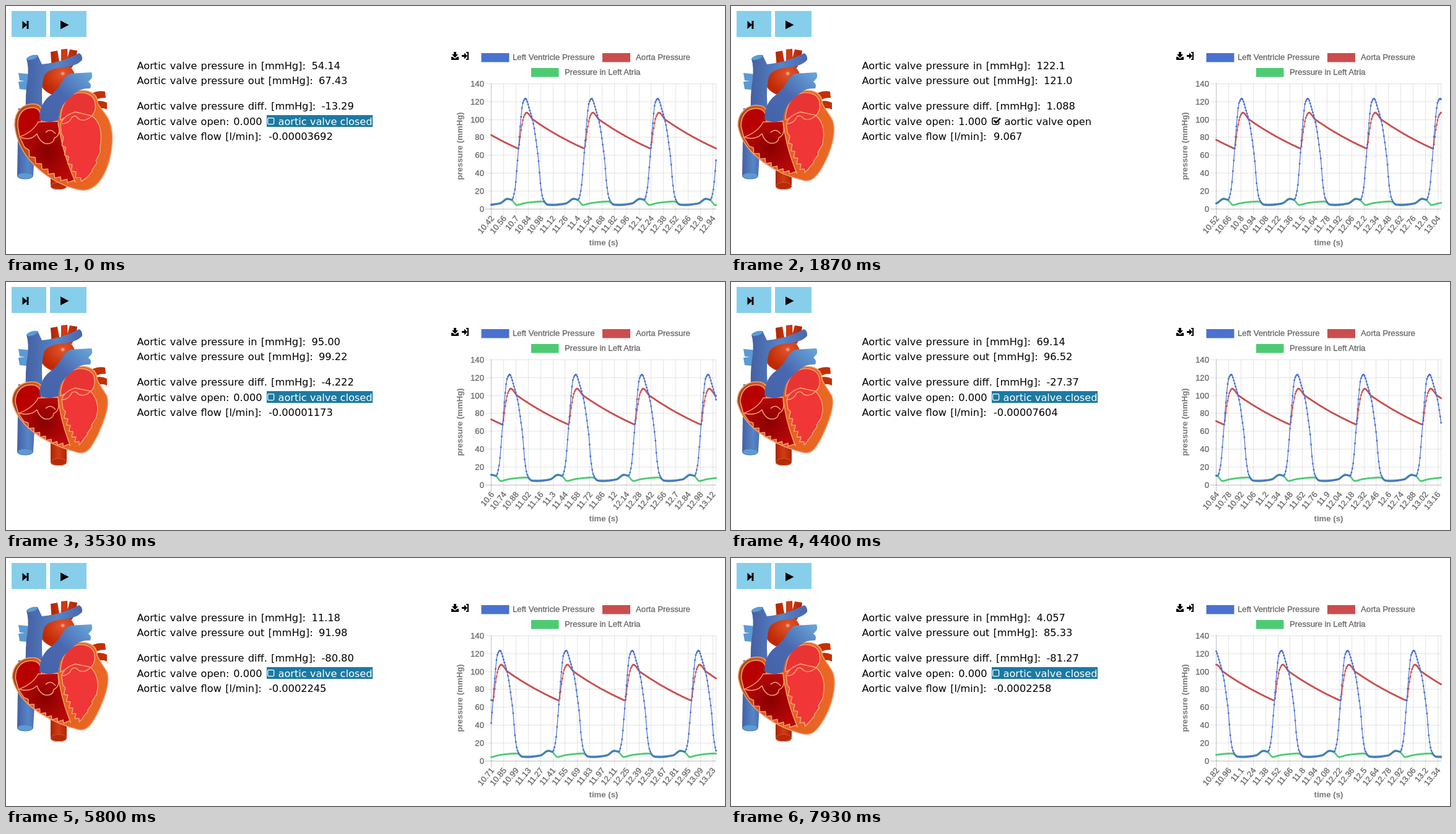
Write an HTML page that moves like this. It is 1161 by 400 pixels and loops after 8 s.

```html
<!DOCTYPE html>
<html lang="en">
<head>
<meta charset="utf-8">
<title>Aortic valve simulation</title>
<style>
html, body { margin: 0; width: 100%; height: 100%; overflow: hidden; background: #fff; }
svg { display: block; }
.read { font: 16.2px "DejaVu Sans", Verdana, sans-serif; }
.label { word-spacing: 1.1px; }
.chart { font: 13.2px "Liberation Sans", Arial, sans-serif; fill: #666; }
.plain { stroke: #666; stroke-width: .3; }
.bold { font-weight: bold; fill: #777; }
.wall { stroke: #f3a273; stroke-width: 1.5; stroke-linejoin: round; }
.line { fill: none; stroke-width: 1.2; }
.dots { fill: none; stroke-width: 3; stroke-linecap: round; }
</style>
</head>
<body>
<svg width="1161" height="400" viewBox="0 0 1161 400">
  <defs>
    <linearGradient id="vein"><stop offset="0" stop-color="#4560a4"/><stop offset=".55" stop-color="#5685c6"/><stop offset="1" stop-color="#4a66ad"/></linearGradient>
    <linearGradient id="artery"><stop offset="0" stop-color="#b02400"/><stop offset=".5" stop-color="#cf3c15"/><stop offset="1" stop-color="#b02400"/></linearGradient>
    <linearGradient id="trunk" x1="0" y1="1" x2="1" y2="0"><stop offset="0" stop-color="#4563a8"/><stop offset=".5" stop-color="#4a68b0"/><stop offset="1" stop-color="#68a8dc"/></linearGradient>
    <radialGradient id="arch" cx=".65" cy=".35" r=".6"><stop offset="0" stop-color="#f6c0a6"/><stop offset=".12" stop-color="#dd5029"/><stop offset="1" stop-color="#c02800"/></radialGradient>
    <radialGradient id="rv"><stop offset="0" stop-color="#880000"/><stop offset="1" stop-color="#b80808"/></radialGradient>
    <linearGradient id="muscle"><stop offset="0" stop-color="#a84512"/><stop offset=".3" stop-color="#e35d1e"/><stop offset="1" stop-color="#ea6825"/></linearGradient>
  </defs>

  <g fill="#87ceeb"><rect x="9" y="8" width="56" height="42"/><rect x="71" y="8" width="59" height="42"/></g>
  <path d="M26.500 24L33.500 30V24H36.500V37H33.500V31L26.500 37ZM88 23.500L101.500 30.500L88 37.500Z"/>

  <g>
    <path fill="url(#artery)" d="M72 235H98V290Q98 296 85 296Q72 296 72 290Z"/>
    <ellipse cx="85" cy="290" rx="12.500" ry="5.500" fill="#b52b08" stroke="#d4562f"/>
    <path fill="url(#vein)" d="M20 165H50L44 274Q42 279 31 279Q19 279 18 274Z"/>
    <ellipse cx="31" cy="274" rx="12.500" ry="5" fill="#5c9bd2" stroke="#4a78b8"/>
    <path fill="#c23000" d="M130 146Q145 135 160 138L161 148Q148 147 140 156ZM136 158Q150 149 163 156L163 167Q154 162 144 168Z"/>
    <path fill="url(#artery)" d="M72 74L83 72L88 100H74ZM89 70L99 69L100 98H89ZM103 70L115 72Q113 90 106 100L96 96Z"/>
    <ellipse cx="83" cy="117" rx="29" ry="27" fill="url(#arch)"/>
    <path fill="#5b9ad4" d="M20 108L40 110V122L22 120ZM20 122L40 120V136L22 134Z"/>
    <path fill="url(#vein)" d="M33 85Q41 78 51 79L58 94Q88 92 118 76Q124 79 123 87Q114 97 92 99Q68 101 62 112Q56 130 59 165L32 168Q31 140 35 118Q37 98 33 85Z"/>
    <ellipse cx="42" cy="83" rx="9" ry="3.500" fill="#5c9bd2" transform="rotate(-16 42 83)"/>
  </g>
  <g id="heart"></g>

  <g class="read">
    <g id="values"></g>
    <g id="shut">
      <rect x="421" y="176" width="171" height="19" fill="#1b7aa3"/>
      <rect x="422.600" y="180.600" width="10" height="10" rx="1.500" fill="none" stroke="#fff" stroke-width="1.300"/>
      <text x="439.500" y="191.500" fill="#fff">aortic valve closed</text>
    </g>
    <g id="ajar">
      <path d="M432.500 186V189Q432.500 191 430.500 191H424Q422 191 422 189V182.500Q422 180.500 424 180.500H430.500" fill="none" stroke="#000" stroke-width="1.500"/>
      <path d="M424.500 184.500L428 188L435 181" fill="none" stroke="#000" stroke-width="2.600"/>
      <text x="441.500" y="191.500">aortic valve open</text>
    </g>
  </g>

  <path d="M723 74H727V78H730L725 83.500L720 78H723ZM719 82H721.500L725 85L728.500 82H731V87H719ZM736 79H740V75.500L745 80.500L740 85.500V82H736ZM743 74H747V87H743V85.200H745V75.800H743Z"/>

  <g class="chart">
    <rect x="767.500" y="76" width="45" height="14.500" fill="#4a71cf"/>
    <rect x="963" y="76" width="45" height="14.500" fill="#cb4d4d"/>
    <rect x="848" y="100" width="44.500" height="14.500" fill="#4dcb73"/>
    <g class="plain">
      <text x="818" y="87">Left Ventricle Pressure</text>
      <text x="1017" y="87">Aorta Pressure</text>
      <text x="902" y="111">Pressure in Left Atria</text>
    </g>
    <text class="bold" x="965" y="385.500" text-anchor="middle">time (s)</text>
    <text class="bold" transform="translate(736.500 226) rotate(-90)" text-anchor="middle">pressure (mmHg)</text>
    <g id="grid" stroke="#000"></g>
    <g id="ticks" class="plain"></g>
  </g>
  <g id="plot"></g>
</svg>
<script>
const $ = id => document.getElementById(id);
const add = (parent, tag, attrs, text = '') => {
  const el = document.createElementNS('http://www.w3.org/2000/svg', tag);
  for (const k in attrs) el.setAttribute(k, attrs[k]);
  el.textContent = text;
  return parent.appendChild(el);
};

// Smooth curve through key points, without overshoot
function spline(pts) {
  const d = pts.slice(1).map(([x, y], i) => (y - pts[i][1]) / (x - pts[i][0]));
  const m = pts.map((_, i) => {
    const a = d[i - 1] ?? d[i], b = d[i] ?? d[i - 1];
    return a * b > 0 ? 2 * a * b / (a + b) : 0;
  });
  return x => {
    let i = 0;
    while (i < d.length - 1 && pts[i + 1][0] < x) i++;
    const [x0, y0] = pts[i], [x1, y1] = pts[i + 1], h = x1 - x0;
    const s = Math.max(0, Math.min(1, (x - x0) / h)), r = 1 - s;
    return r * r * (1 + 2 * s) * y0 + s * s * (3 - 2 * s) * y1 + h * s * r * (r * m[i] - s * m[i + 1]);
  };
}

// Pressures over one heartbeat; the phase p is in steps of 0.01 s
const BEAT = 75.33, SPAN = 256;
const ventricle = spline([[0, 54.14], [3, 92], [6, 118.2], [9, 123], [14, 109.6], [18, 95], [22, 69.143],
  [24, 53], [26, 28.5], [29, 11.18], [34, 4.548], [40, 4.057], [55, 5.8], [64, 10.9], [69, 10.2],
  [72.3, 21.5], [BEAT, 54.14]]);
const atrium = spline([[0, 4.2], [10, 6.6], [28, 8.1], [35, 4.9], [42, 4.9], [55, 6.2], [63.7, 11.4],
  [69, 9.3], [74.5, 4.2], [BEAT, 4.2]]);
const decay = p => 10.6 + 81.38 * Math.exp(-.00775 * (p - 29));
const ejection = spline([[0, 67.43], [1, 67.6], [4, 88], [7, 102.5], [10.3, 107.3], [17, decay(17)]]);
const aorta = p => p < 17 ? ejection(p) : decay(p);
const valveDrop = p => 1.756 - .16696 * (p - 6);

const phase = n => ((n % BEAT) + BEAT) % BEAT;
const curves = [['#4dcb73', atrium], ['#cb4d4d', aorta], ['#4a71cf', ventricle]].map(([stroke, fn]) => ({
  fn,
  line: add($('plot'), 'path', { class: 'line', stroke }),
  dots: add($('plot'), 'path', { class: 'dots', stroke })
}));

const X0 = 783.5, X1 = 1146.5, Y0 = 327, DX = (X1 - X0) / SPAN, DY = 202.3 / 140;
const rule = (x1, y1, x2, y2, o) =>
  add($('grid'), 'path', { d: `M${x1} ${y1}L${x2} ${y2}`, 'stroke-opacity': o });
for (let v = 0; v <= 140; v += 20) {
  const y = Math.round(Y0 - v * DY) + .5;
  rule(X0 - 10, y, X1, y, v ? .1 : .25);
  add($('ticks'), 'text', { x: 772, y: y + 4, 'text-anchor': 'end' }, v);
}
const times = Array.from({ length: 19 }, (_, i) => {
  const x = X0 + i * 14 * DX, gx = Math.floor(x + .3) + .5;
  rule(gx, 124.5, gx, 337.5, i ? .1 : .25);
  return add($('ticks'), 'text', {
    transform: `translate(${x + 2} 340) rotate(-50)`, 'text-anchor': 'end', y: 4.5
  });
});
rule(X1, 124.5, X1, 327, .1);

const [pinText, poutText, diffText, openText, flowText] = [
  ['pressure in [mmHg]:', 102, 493.5],
  ['pressure out [mmHg]:', 126, 505],
  ['pressure diff. [mmHg]:', 166.5, 509.5],
  ['open:', 191.5, 367.3],
  ['flow [l/min]:', 216, 424]
].map(([label, y, x]) => {
  add($('values'), 'text', { class: 'label', x: 211.5, y }, 'Aortic valve ' + label);
  return add($('values'), 'text', { x, y });
});

// Ragged muscle edge: teeth along a quadratic curve from a over c to b
function ragged(a, c, b, n) {
  let d = '';
  for (let i = 1; i <= n; i++) {
    const s = i / n, r = 1 - s, tooth = i < n ? (i % 2 ? 2.2 : -2.2) : 0;
    const [x, y] = [0, 1].map(j => r * r * a[j] + 2 * r * s * c[j] + s * s * b[j]);
    d += `L${(x + tooth).toFixed(1)} ${(y - tooth).toFixed(1)}`;
  }
  return d;
}

// Heart parts: fill, relaxed outline, contracted outline
const parts = [
  ['url(#muscle)',
    'M14 193C13 168 29 157 45 158C55 158 60 165 62 185L85 180C85 160 95 140 115 137C135 134 148 142 148 157C152 165 163 175 167 186C178 215 168 262 150 284C140 296 128 299 116 296C75 287 20 250 14 193Z',
    'M10 193C10 171 27 160 43 161C55 161 59 168 61 185L85 180C85 160 95 140 115 137C135 134 147 142 147 157C150 165 158 175 163 184C168 200 158 225 149 245C138 268 130 279 116 275C80 266 20 240 10 193Z'],
  ['#b80000',
    'M19 194C18 172 30 163 44 164C54 165 57 172 57 187Q50 200 40 207Q28 212 22 211Z',
    'M15 194C15 174 28 165 42 166C54 167 57 174 57 187Q50 200 40 207Q28 213 20 212Z'],
  ['#e93434',
    'M88 184C88 162 98 143 116 140C132 138 144 146 144 158C146 168 141 174 138 178L112 171Z',
    'M88 184C88 162 98 143 116 140C132 138 143 146 143 158C144 168 140 174 136 177L112 171Z'],
  ['url(#rv)',
    `M22 211Q44 203 52 187L84 186Q90 235 112 284${ragged([112, 284], [70, 282], [30, 228], 16)}Z`,
    `M20 212Q44 203 52 187L84 186Q88 225 104 264${ragged([104, 264], [66, 262], [29, 225], 16)}Z`],
  ['#f03636',
    `M112 171L138 177C152 185 156 205 152 228${ragged([152, 228], [145, 270], [122, 283], 8)}${ragged([122, 283], [98, 260], [89, 205], 12)}L88 190Q94 176 112 171Z`,
    `M112 171L136 176C146 185 150 200 147 213${ragged([147, 213], [134, 246], [118, 263], 8)}${ragged([118, 263], [103, 243], [92, 205], 12)}L90 190Q94 176 112 171Z`],
  ['none',
    'M24 212Q40 218 50 206Q54 219 64 222Q77 223 78 213Q90 208 84 190M64 204Q72 196 80 206',
    'M22 212Q40 216 50 206Q54 218 63 221Q76 222 77 212Q88 207 84 190M64 204Q72 196 80 206'],
  ['none',
    'M90 190Q102 190 106 180Q112 174 117 182Q126 188 138 178',
    'M91 190Q102 189 106 179Q112 174 117 181Q126 186 136 177']
].map(([fill, rest, tight]) => ({ el: add($('heart'), 'path', { class: 'wall', fill }), rest, tight }));
add($('heart'), 'path', {
  fill: 'url(#trunk)',
  d: 'M104 109L138 107Q141 114 137 118L133 122Q139 126 136 133Q120 132 110 142Q94 154 88 166Q86 172 85 183Q70 191 54 183Q54 160 68 147Q82 137 90 123Q95 113 104 109Z'
});

const mix = (a, b, f) => {
  const to = b.match(/[\d.]+/g);
  let i = 0;
  return a.replace(/[\d.]+/g, v => (+v + (to[i++] - v) * f).toFixed(2));
};

// Contraction: eases in, holds, then relaxes
function squeeze(t) {
  const s = Math.min(1, t / 2900), relax = Math.max(0, (t - 4400) / 5400);
  return s * s * (3 - 2 * s) - relax * relax;
}

function drawStep(k) {
  times.forEach((el, i) => el.textContent = +(10.42 + k * .01 + i * .14).toFixed(2));
  for (const c of curves) {
    const pts = Array.from({ length: SPAN + 1 }, (_, i) =>
      (X0 + i * DX).toFixed(2) + ' ' + (Y0 - c.fn(phase(i + k - SPAN)) * DY).toFixed(2));
    c.line.setAttribute('d', 'M' + pts.join('L'));
    c.dots.setAttribute('d', pts.map(p => `M${p}h.01`).join(''));
  }
  const pin = ventricle(k), open = pin > 70 && valveDrop(k) > 0;
  const pout = open ? pin - valveDrop(k) : aorta(k);
  const diff = pin - pout, num = v => v.toPrecision(4);
  pinText.textContent = num(pin);
  poutText.textContent = num(pout);
  diffText.textContent = num(diff);
  openText.textContent = open ? '1.000' : '0.000';
  flowText.textContent = num(diff * (open ? 8.332 : 2.7779e-6));
  $('ajar').style.display = open ? '' : 'none';
  $('shut').style.display = open ? 'none' : '';
}

const LOOP = 8000, TICK = LOOP / 120;
let lastTick = -1, lastStep = -1;
function draw(t) {
  const tick = Math.floor(t % LOOP / TICK), step = Math.floor((tick + 2) / 3);
  if (tick !== lastTick) {
    const f = squeeze(tick * TICK);
    for (const p of parts) p.el.setAttribute('d', mix(p.rest, p.tight, f));
    lastTick = tick;
  }
  if (step !== lastStep) drawStep(lastStep = step);
}
const start = performance.now();
const loop = () => {
  draw(performance.now() - start);
  requestAnimationFrame(loop);
};
loop();
</script>
</body>
</html>
```
